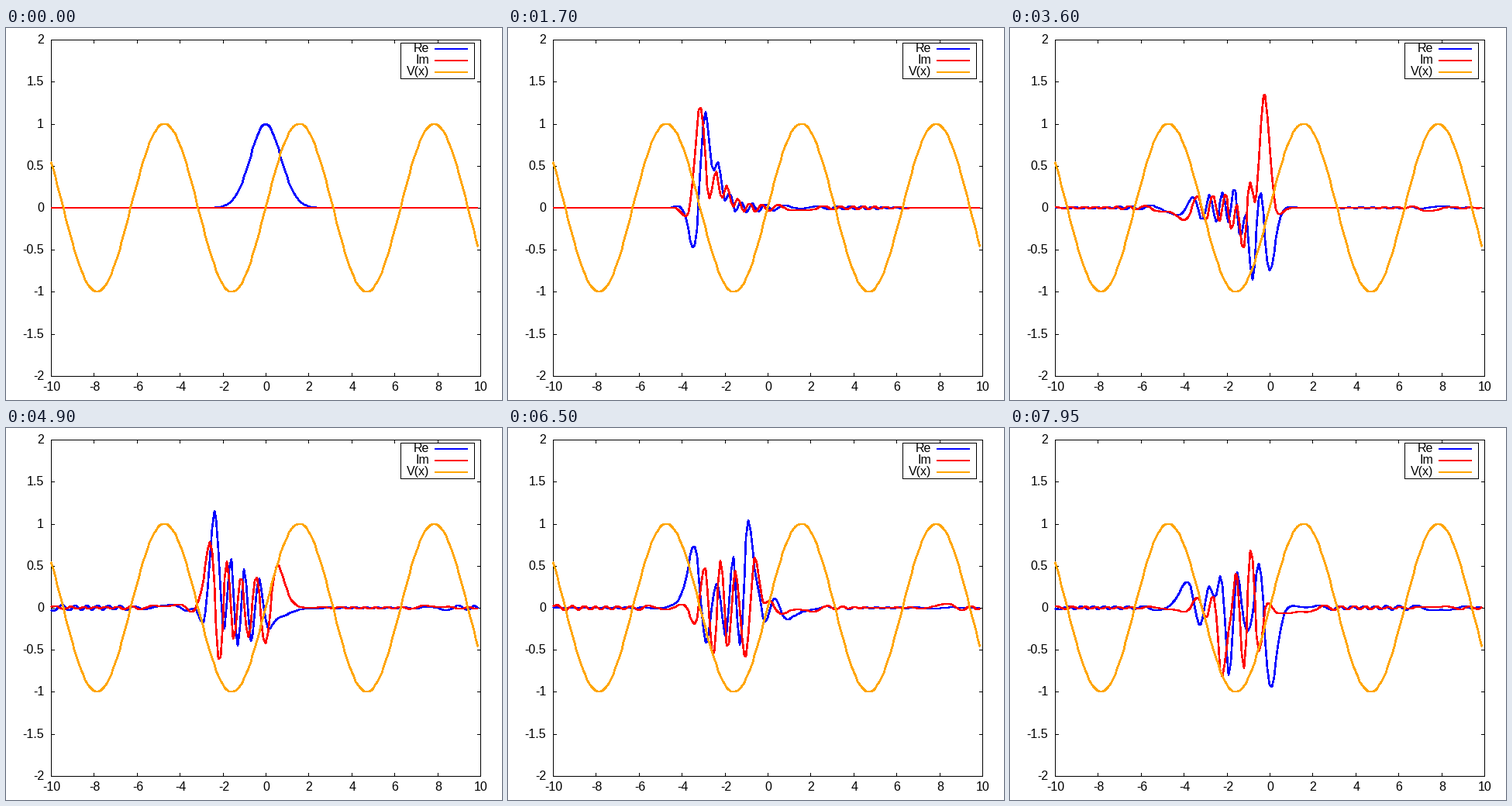
A matplotlib script for the animation above (8000 ms loop, 640 px wide and 480 px high).

```python
import numpy as np
import matplotlib.pyplot as plt
from matplotlib.animation import FuncAnimation

DPI = 100
PX = 72 / DPI
LEFT, RIGHT, TOP, BOTTOM = 58, 612, 15, 449
FRAMES, INTERVAL, DT = 160, 50, 0.1
plt.rcParams["font.family"] = "Liberation Sans"

# Schroedinger equation, periodic grid, spectral kinetic energy: h = 1, m = 1, V = sin(x)
HBAR, N, DX = 1 / (2 * np.pi), 200, 0.1
x = -10 + DX * np.arange(N)
V = np.sin(x)
k = 2 * np.pi * np.fft.fftfreq(N, DX)
kinetic = np.fft.ifft((HBAR * k[:, None]) ** 2 / 2 * np.fft.fft(np.eye(N), axis=0), axis=0).real
energy, modes = np.linalg.eigh(kinetic + np.diag(V))
weights = modes.T @ np.exp(-x**2)


def psi(t):
    return modes @ (weights * np.exp(-1j * energy * t / HBAR))


def to_px(v):
    return LEFT + (v + 10) * (RIGHT - LEFT) / 20


def to_py(v):
    return BOTTOM - (v + 2) * (BOTTOM - TOP) / 4


fig = plt.figure(figsize=(640 / DPI, 480 / DPI), dpi=DPI, facecolor="white")
ax = fig.add_axes([0, 0, 1, 1])
ax.set_xlim(-0.5, 639.5)
ax.set_ylim(479.5, -0.5)
ax.axis("off")


def thin(xs, ys):
    ax.plot(xs, ys, color="black", lw=PX, antialiased=False, snap=False,
            solid_capstyle="projecting", solid_joinstyle="miter")


def box(x0, y0, x1, y1):
    thin([x0, x1, x1, x0, x0], [y0, y0, y1, y1, y0])


def label(px, baseline, text, align):
    ax.text(px, baseline, text, size=16 * PX, ha=align, va="baseline")


def curve(xs, ys, color, width):
    return ax.plot(xs, ys, color=color, lw=width * PX, antialiased=False, snap=False,
                   solid_capstyle="butt", solid_joinstyle="round")[0]


box(LEFT, TOP, RIGHT, BOTTOM)
for v in range(-10, 11, 2):
    px = round(to_px(v))
    thin([px, px], [BOTTOM, BOTTOM - 4])
    thin([px, px], [TOP, TOP + 4])
    label(px + 0.5, 467.5, f"{v}", "center")
for v in np.arange(-2, 2.1, 0.5):
    py = round(to_py(v))
    thin([LEFT, LEFT + 4], [py, py])
    thin([RIGHT, RIGHT - 4], [py, py])
    label(48.5, py + 4.5, f"{v:g}", "right")

box(509, 19, 604, 65)
xs = np.rint(to_px(x)) - 0.5
lines = []
for name, color, y in (("Re", "#0000ff", 26), ("Im", "#ff0000", 41), ("V(x)", "#ffa500", 56)):
    label(545.5, y + 4.5, name, "right")
    curve([553, 595], [y + 0.5, y + 0.5], color, 2)
    lines.append(curve(xs, np.rint(to_py(V)) - 0.5, color, 1.6))


def draw(frame):
    wave = psi(frame * DT)
    for line, part in zip(lines, (wave.real, wave.imag)):
        line.set_ydata(np.rint(to_py(part)) - 0.5)
    return lines


anim = FuncAnimation(fig, draw, frames=FRAMES, interval=INTERVAL, repeat=True, repeat_delay=0)
plt.show()
```
